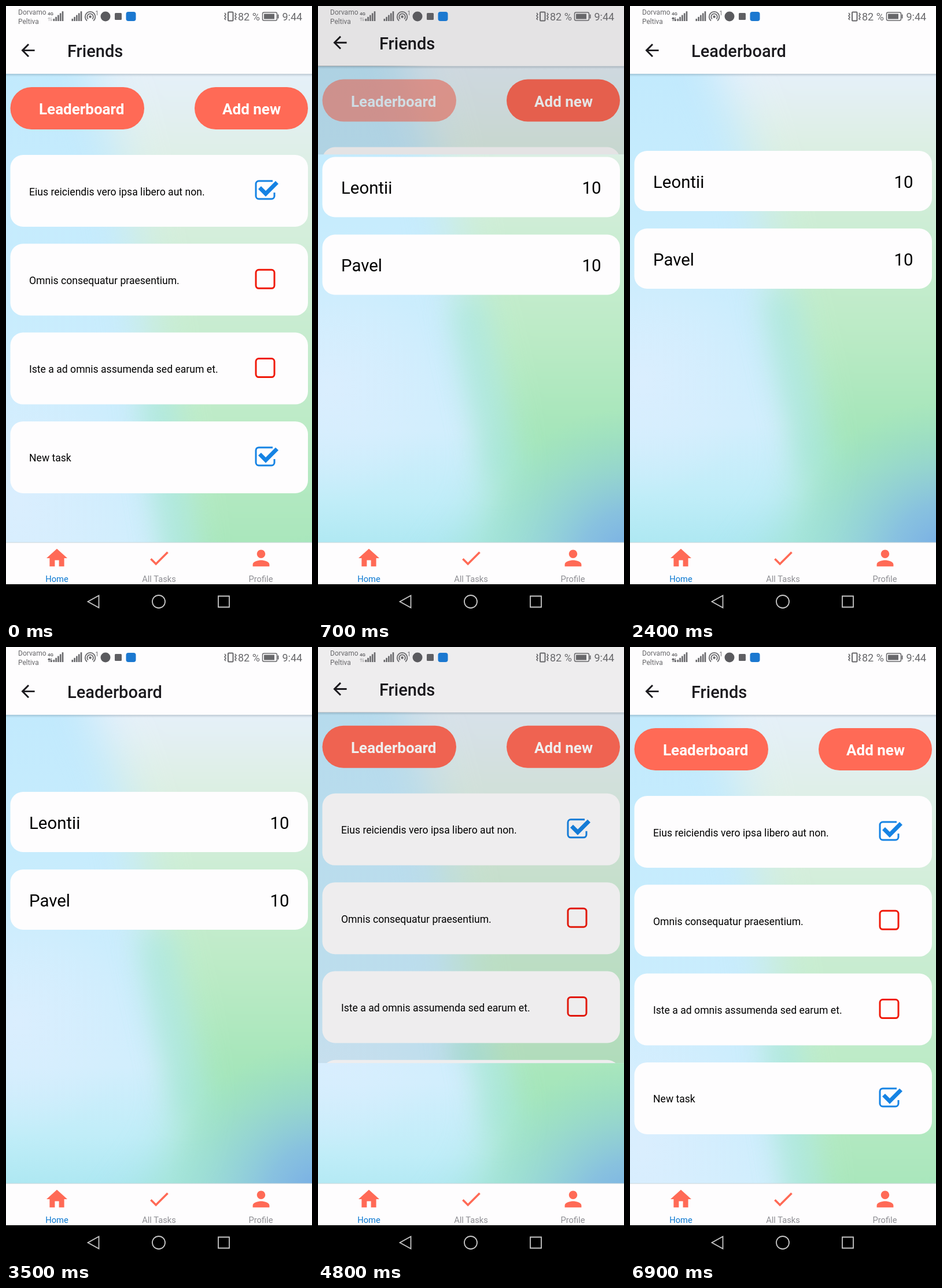
These frames come from a looping animation (529 by 1058 pixels, 7 s). An HTML page:

```html
<!DOCTYPE html>
<html lang="en">
<head>
<meta charset="utf-8">
<title>Friends and leaderboard</title>
<style>
  html, body { margin: 0; width: 100%; height: 100%; overflow: hidden; background: #000; }
  svg { display: block; }
  text { font-family: Roboto, "Noto Sans", sans-serif; }
</style>
</head>
<body>
<svg id="stage" width="100%" height="100%" viewBox="0 0 529 1058">
  <defs>
    <linearGradient id="cool" gradientUnits="userSpaceOnUse" x1="0" y1="0" x2="0" y2="809">
      <stop offset="0" stop-color="#c2eafd"/>
      <stop offset=".3" stop-color="#c7ecfd"/>
      <stop offset=".75" stop-color="#d2eefd"/>
      <stop offset=".9" stop-color="#c0edf8"/>
      <stop offset="1" stop-color="#aee8f2"/>
    </linearGradient>
    <linearGradient id="warm" gradientUnits="userSpaceOnUse" x1="0" y1="0" x2="0" y2="809">
      <stop offset="0" stop-color="#e6f0fb"/>
      <stop offset=".14" stop-color="#deefe4"/>
      <stop offset=".33" stop-color="#ccedd4"/>
      <stop offset=".55" stop-color="#bcebc6"/>
      <stop offset=".78" stop-color="#a2e5b8"/>
      <stop offset="1" stop-color="#a4e4d8"/>
    </linearGradient>
    <radialGradient id="glow" gradientUnits="userSpaceOnUse" cx="20" cy="530" r="200">
      <stop offset="0" stop-color="#daeefe"/>
      <stop offset="1" stop-color="#daeefe" stop-opacity="0"/>
    </radialGradient>
    <radialGradient id="corner" gradientUnits="userSpaceOnUse" cx="545" cy="835" r="270">
      <stop offset="0" stop-color="#74a9e6"/>
      <stop offset=".35" stop-color="#7fb6e4" stop-opacity=".75"/>
      <stop offset="1" stop-color="#90d8d0" stop-opacity="0"/>
    </radialGradient>
    <linearGradient id="shade" x1="0" y1="0" x2="0" y2="1">
      <stop offset="0" stop-color="#234" stop-opacity=".2"/>
      <stop offset="1" stop-color="#234" stop-opacity="0"/>
    </linearGradient>
    <filter id="soft" filterUnits="userSpaceOnUse" x="-150" y="-150" width="850" height="1150" color-interpolation-filters="sRGB">
      <feGaussianBlur stdDeviation="36"/>
    </filter>
    <filter id="seam" filterUnits="userSpaceOnUse" x="100" y="250" width="400" height="600" color-interpolation-filters="sRGB">
      <feGaussianBlur stdDeviation="24"/>
    </filter>
    <g id="bg">
      <rect width="529" height="830" fill="url(#cool)"/>
      <rect width="529" height="830" fill="url(#glow)"/>
      <path d="M120-150L150 0C230 150 235 300 268 430S320 640 300 720S200 830 150 1000H700V-150Z" fill="url(#warm)" filter="url(#soft)"/>
      <path d="M258 380C275 500 290 560 325 690" fill="none" stroke="#9fe6d8" stroke-width="58" opacity=".55" filter="url(#seam)"/>
      <rect width="529" height="830" fill="url(#corner)"/>
    </g>
  </defs>
  <g id="friends"></g>
  <rect id="dim" width="529" height="926"/>
  <svg id="sheet" width="529" height="926" overflow="hidden"><g id="board"></g></svg>
  <g id="chrome"></g>
</svg>
<script>
const LOOP = 7000, STEP = 100, H = 926;
const CORAL = '#ff6a56', PAPER = '#fefdfe', GREY = '#68686b';
const OPEN = 580, CLOSE = 4666, SLIDE = 425;
const $ = id => document.getElementById(id);

const text = (x, y, size, str, extra = '') =>
  `<text x="${x}" y="${y}" font-size="${size}" ${extra}>${str}</text>`;
const box = (x, y, w, h, r, fill) =>
  `<rect x="${x}" y="${y}" width="${w}" height="${h}" rx="${r}" fill="${fill}"/>`;
const icon = (x, y, k, d, fill) =>
  `<path transform="translate(${x} ${y}) scale(${k})" d="${d}" fill="${fill}"/>`;
const line = (d, color, w) =>
  `<path d="${d}" fill="none" stroke="${color}" stroke-width="${w}"/>`;

const backdrop = stretch => `<use href="#bg" transform="translate(0 117) scale(1 ${stretch})"/>`;
const header = title =>
  box(0, 117, 529, 5, 0, 'url(#shade)') + box(0, 0, 529, 117, 0, PAPER) +
  icon(20.6, 59.2, 1.45, 'M20 11H7.83l5.59-5.59L12 4l-8 8 8 8 1.41-1.41L7.83 13H20v-2z', '#1c1b1f') +
  text(106, 88, 29, title, 'font-weight="500" fill="#1c1b1f"');
const pill = (id, x, w, tx, label) =>
  `<g id="${id}">${box(x, 140, w, 73, 36.5, CORAL)}${text(tx, 187, 26, label, 'font-weight="700" fill="#fff"')}</g>`;

const tick = done => done
  ? line('M461 -16H437a5 5 0 0 0-5 5V10a5 5 0 0 0 5 5H459a5 5 0 0 0 5-5V4', '#1583e4', 3) +
    line('M438.500-4.500L449 6L468.500-13.500', '#1583e4', 7)
  : '<rect x="432" y="-16" width="32" height="32" rx="5" fill="none" stroke="#f01a0a" stroke-width="3"/>';
const task = ([label, done], i) => `<g transform="translate(0 ${257 + i * 153.3})">
  ${box(7.5, 0, 514.5, 124, 22, PAPER)}${text(40, 69.5, 17.6, label)}
  <g transform="translate(0 61)">${tick(done)}</g></g>`;
const player = ([name, score], i) => `<g transform="translate(0 ${250 + i * 134})">
  ${box(7.5, 0, 514.5, 104, 22, PAPER)}${text(40, 63.5, 29.4, name)}
  ${text(489.500, 63.5, 29.4, score, 'text-anchor="end"')}</g>`;

$('friends').innerHTML = backdrop(1.4) + header('Friends') +
  pill('press', 7.5, 231.5, 57, 'Leaderboard') + pill('add', 326, 196, 374, 'Add new') +
  [['Eius reiciendis vero ipsa libero aut non.', true],
   ['Omnis consequatur praesentium.', false],
   ['Iste a ad omnis assumenda sed earum et.', false],
   ['New task', true]].map(task).join('');

$('board').innerHTML = backdrop(1) + header('Leaderboard') +
  '<circle id="ripple" cx="38" cy="77" r="0" opacity=".1"/>' +
  [['Leontii', 10], ['Pavel', 10]].map(player).join('');

const bars = x => [0, 1, 2, 3, 4].map(i =>
  box(x + i * 3.8, 22 - i * 3.2, 2.6, 4 + i * 3.2, 0, GREY)).join('');
const zigzag = x => line(`M${x} 12l2 2.500-2 2.500 2 2.500-2 2.500 2 2`, GREY, 1.6);

const status =
  text(21, 15, 12, 'Dorvamo', `fill="${GREY}"`) + text(21, 31, 12, 'Peltiva', `fill="${GREY}"`) +
  text(72, 16, 8, '4G', `fill="${GREY}" font-weight="700"`) +
  `<g id="data">${line('M74.500 26V20M72.500 22L74.500 20L76.500 22M78 19.500V25.500M76.500 23.500L78 25.500L80 23.500', '#4c4c50', 1.2)}</g>` +
  bars(81.5) + bars(113.5) +
  `<circle cx="145.600" cy="18.500" r="2.200" fill="${GREY}"/>` +
  line('M141.900 22.500a5.300 5.300 0 1 1 7.400 0M140 25.500a8.800 8.800 0 1 1 11.200 0', GREY, 1.8) +
  text(154.5, 16, 10, '1', `fill="${GREY}"`) +
  '<circle cx="172" cy="18" r="8.500" fill="#5a5a5e"/>' +
  box(188, 12, 12, 12, 1.5, '#5f5f63') + box(207.5, 10, 17, 16, 4, '#1b78d0') +
  zigzag(378) + `<rect x="384" y="10.500" width="8.500" height="15" rx="1" fill="none" stroke="${GREY}" stroke-width="2"/>` + zigzag(396) +
  text(401, 24.5, 18, '82 %', `fill="${GREY}"`) +
  `<rect x="443.500" y="11" width="25" height="14" rx="2.500" fill="none" stroke="${GREY}" stroke-width="1.500"/>` +
  box(446, 13.5, 18, 9, 0.5, GREY) + box(469.5, 14.5, 2, 7, 0.5, GREY) +
  text(477.5, 24.5, 18, '9:44', `fill="${GREY}"`);

const tab = (x, ix, label, color, d) => icon(ix, 931.3, 1.8, d, CORAL) +
  text(x, 994, 14.7, label, `text-anchor="middle" fill="${color}"`);
const tabs = box(0, 926, 529, 72, 0, PAPER) + box(0, 925.5, 529, 1, 0, '#ced8dc') +
  tab(88, 66.4, 'Home', '#0a78d1', 'M10 20v-6h4v6h5v-8h3L12 3 2 12h3v8z') +
  tab(264.5, 243, 'All Tasks', '#8e8e93', 'M9 16.200L4.800 12l-1.400 1.400L9 19 21 7l-1.400-1.400z') +
  tab(440.5, 419.4, 'Profile', '#8e8e93', 'M12 12c2.210 0 4-1.790 4-4s-1.790-4-4-4-4 1.790-4 4 1.790 4 4 4zm0 2c-2.670 0-8 1.340-8 4v2h16v-2c0-2.660-5.330-4-8-4z');
const nav = box(0, 998, 529, 60, 0, '#000') +
  line('M141.500 1028L160.500 1017.500V1038.500Z', '#c8c8c8', 1.8) +
  line('M253 1028a11 11 0 1 1 22 0a11 11 0 1 1-22 0', '#c8c8c8', 1.8) +
  line('M367 1018.500H386V1037.500H367Z', '#c8c8c8', 1.8);
$('chrome').innerHTML = status + tabs + nav;

const clamp = v => Math.min(1, Math.max(0, v));
const span = (t, from, ms) => clamp((t - from) / ms);
const smooth = v => v < .5 ? 2 * v * v : 1 - 2 * (1 - v) ** 2;

// cubic-bezier(.35, .45, 0, 1), solved by bisection
function reveal(x) {
  if (x <= 0 || x >= 1) return clamp(x);
  const curve = (s, a, b) => 3 * (1 - s) ** 2 * s * a + 3 * (1 - s) * s * s * b + s ** 3;
  let lo = 0, hi = 1;
  for (let i = 0; i < 24; i++) {
    const mid = (lo + hi) / 2;
    if (curve(mid, .35, 0) < x) lo = mid; else hi = mid;
  }
  return curve(lo, .45, 1);
}

function draw(t) {
  const p = reveal(span(t, OPEN, SLIDE)) - reveal(span(t, CLOSE, SLIDE));
  const away = H * (1 - p);
  $('friends').setAttribute('transform', `translate(0 ${-.02 * H * p})`);
  $('dim').setAttribute('opacity', .1 * clamp(p / .36));
  $('sheet').setAttribute('y', away);
  $('sheet').setAttribute('visibility', p > 0 ? 'visible' : 'hidden');
  $('board').setAttribute('transform', `translate(0 ${-.959 * away})`);

  const held = smooth(span(t, 400, 150)) - smooth(span(t, OPEN, 250));
  $('press').setAttribute('opacity', 1 - .8 * held);
  $('ripple').setAttribute('r', t < CLOSE ? 32 * span(t, 4480, 120) : 0);

  const busy = (t >= 900 && t < 3900) || t >= 6900;
  $('data').setAttribute('opacity', busy ? 1 : .3);
}

const start = performance.now();
function loop() {
  const t = (performance.now() - start) % LOOP;
  draw(Math.floor(t / STEP) * STEP);
  requestAnimationFrame(loop);
}
loop();
</script>
</body>
</html>
```
